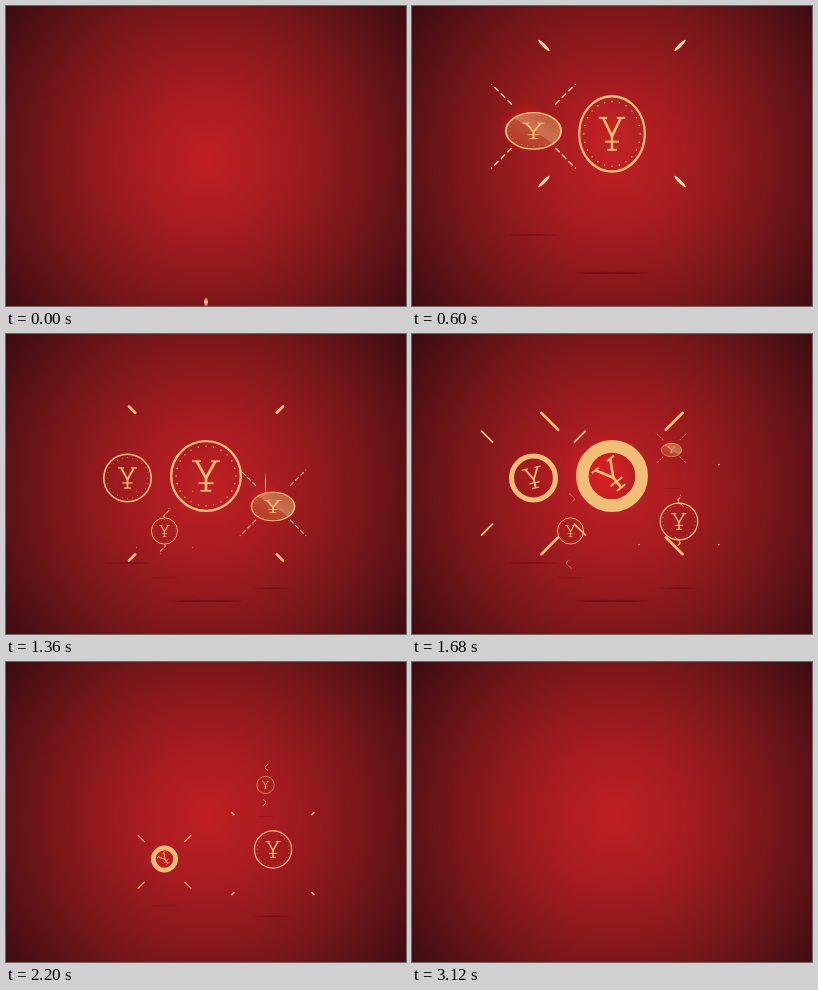
An HTML page with a canvas for the animation above (3320 ms loop, 400x300 px).

```html
<!DOCTYPE html>
<html lang="en">
<head>
<meta charset="utf-8">
<title>Coins</title>
<style>
html, body { margin: 0; width: 100%; height: 100%; overflow: hidden; }
body { background: radial-gradient(circle at 202px 154px,
  #bf2024, #a61c20 72px, #7a1719 154px, #3a0c12 255px); }
canvas { display: block; width: 400px; height: 300px; }
</style>
</head>
<body>
<canvas id="stage"></canvas>
<script>
const LOOP = 3320, STEP = 40, TAU = Math.PI * 2;
const GOLD = '#eebf74', PALE = '#fbdc9c';
const canvas = document.getElementById('stage');
const ctx = canvas.getContext('2d');
const ratio = window.devicePixelRatio || 1;
canvas.width = 400 * ratio;
canvas.height = 300 * ratio;

// start is the moment of the pop; each coin runs the same cycle around it
const coins = [
  { x: 200, y: 142, r: 36, start: 480 },
  { x: 121.5, y: 144, r: 24.5, start: 600 },
  { x: 158.5, y: 197, r: 13.5, start: 1000 },
  { x: 267, y: 187.5, r: 19.2, start: 1360 },
  { x: 259.5, y: 123, r: 9, start: 1680 }
];

const progress = (p, from, to) => Math.min(1, Math.max(0, (p - from) / (to - from)));
const easeOut = (u, power) => 1 - (1 - u) ** power;
const approach = (time, tau) => 1 - Math.exp(-Math.max(0, time) / tau);
const bell = (p, centre, width) => Math.exp(-(((p - centre) / width) ** 2));

function ellipse(x, y, rx, ry) {
  ctx.beginPath();
  ctx.ellipse(x, y, rx, ry, 0, 0, TAU);
  ctx.fill();
}

function line(x1, y1, x2, y2) {
  ctx.beginPath();
  ctx.moveTo(x1, y1);
  ctx.lineTo(x2, y2);
  ctx.stroke();
}

// all parts draw in units of the coin radius, p in ms from the pop

function shadow(p) {
  const width = progress(p, -160, 0) * (1 - progress(p, 1200, 1420));
  ctx.fillStyle = 'rgba(85,5,14,.45)';
  ellipse(0, 3.47, width, 0.03);
}

function streak(p, r) {
  const launch = -340 - 4 * r;
  const height = delay => 4.4 - 5.4 * easeOut(progress(p - delay, launch, launch + 260), 3);
  const top = height(0), end = height(55);
  if (end <= top) return;
  const g = ctx.createLinearGradient(0, top, 0, end);
  g.addColorStop(0, 'rgba(255,200,120,.35)');
  g.addColorStop(0.5, PALE);
  g.addColorStop(1, 'rgba(255,200,120,.35)');
  ctx.fillStyle = g;
  ellipse(0, (top + end) / 2, 0.05, (end - top) / 2);
}

// four diagonal marks around a centre, from a to b on each axis
function diagonals(cy, a, b, mark) {
  for (let i = 0; i < 4; i++) {
    ctx.save();
    ctx.translate(0, cy);
    ctx.rotate(TAU * (i + 0.5) / 4);
    mark(a * Math.SQRT2, b * Math.SQRT2);
    ctx.restore();
  }
}

function burst(p) {
  if (p < -120 || p > 430) return;
  const a = 2.1 * approach(p + 55, 100);
  const b = 2.1 * approach(p + 120, 72) + 0.02;
  ctx.fillStyle = ctx.strokeStyle = PALE;
  ctx.lineWidth = 0.055;
  diagonals(-0.97 + 0.14 * progress(p, 0, 400) ** 2, a, b, (from, to) => {
    if (p < 60) {
      ctx.setLineDash([0.25, 0.13]);
      line(from, 0, to, 0);
      ctx.setLineDash([]);
    } else {
      ellipse((from + to) / 2, 0, (to - from) / 2, 0.05 - 0.02 * progress(p, 60, 320));
    }
  });
}

function gather(p) {
  const u = progress(p, 810, 1400);
  const a = 2.07 * (1 - 0.42 * u), b = 2.14 * (1 - u ** 6);
  if (u === 0 || a >= b) return;
  ctx.strokeStyle = GOLD;
  ctx.lineWidth = 0.075;
  ctx.lineCap = 'round';
  diagonals(0.21, a, b, (from, to) => line(from, 0, to, 0));
  ctx.lineCap = 'butt';
}

function ribbons(p) {
  const u = progress(p, 260, 760);
  if (u === 0 || u === 1) return;
  const near = 0.6 + 1.8 * u, far = 0.8 + 2.1 * easeOut(u, 2);
  const n = 24;
  const wave = y => 0.12 + 0.17 * Math.cos((y - 1.52) * 7.4);
  ctx.fillStyle = GOLD;
  for (const side of [-1, 1]) {
    ctx.save();
    ctx.scale(-side, side);
    ctx.globalAlpha = 1 - progress(p, 560, 800);
    ctx.beginPath();
    for (let i = 0; i <= 2 * n; i++) {
      const v = (i <= n ? i : 2 * n - i) / n;
      const y = near + (far - near) * v;
      const half = (0.015 + 0.035 * Math.abs(Math.sin(v * TAU))) * (i <= n ? 1 : -1);
      ctx.lineTo(wave(y) + half, y);
    }
    ctx.fill();
    ellipse(wave(far), far + 0.1, 0.03, 0.03);
    ctx.restore();
  }
}

function glow(p, y) {
  const alpha = 0.55 * bell(p, 0, 110) + 0.45 * bell(p, 1210, 110);
  if (alpha < 0.01) return;
  const g = ctx.createRadialGradient(-0.3, y - 0.15, 0.3, -0.3, y - 0.15, 1.1);
  g.addColorStop(0, `rgba(245,30,35,${alpha})`);
  g.addColorStop(1, 'rgba(245,30,35,0)');
  ctx.fillStyle = g;
  ctx.fillRect(-2, y - 2, 4, 4);
}

function shine(alpha) {
  const g = ctx.createLinearGradient(-0.7, 0.7, 0.7, -0.7);
  g.addColorStop(0, 'rgba(175,65,42,.8)');
  g.addColorStop(0.5, 'rgba(190,85,55,.85)');
  g.addColorStop(0.52, 'rgba(208,130,88,.85)');
  g.addColorStop(1, 'rgba(195,105,68,.85)');
  ctx.globalAlpha = alpha;
  ctx.fillStyle = g;
  ellipse(0, 0, 1, 1);
  ctx.globalAlpha = 1;
}

function emblem() {
  ctx.lineWidth = 0.075;
  for (const side of [-1, 1]) {
    line(side * 0.26, -0.41, 0, 0.06);
  }
  line(0, 0.03, 0, 0.42);
  ctx.lineWidth = 0.05;
  for (const side of [-1, 1]) {
    line(side * 0.14, -0.41, side * 0.39, -0.41);
  }
  line(-0.21, 0.2, 0.21, 0.2);
  line(-0.15, 0.41, 0.15, 0.41);
}

function rim() {
  const count = 24;
  for (let i = 0; i < count; i++) {
    const angle = i * TAU / count;
    ellipse(0.83 * Math.cos(angle), 0.83 * Math.sin(angle), 0.02, 0.02);
  }
}

function coin(p) {
  if (p < -180 || p >= 1420) return;
  const y = progress(p, -180, 205) ** 2 - 1;
  const age = Math.max(0, p);
  const wobble = 0.2 * Math.cos(age * Math.PI / 140) * Math.exp(-age / 130);
  const size = easeOut(progress(p, -180, 0), 2) * (1 - progress(p, 1230, 1420) ** 2);
  const close = progress(p, 960, 1420);
  const band = 0.065 + 0.55 * close;

  glow(p, y);
  ctx.save();
  ctx.translate(0, y);
  ctx.scale(size * (1 + 0.8 * wobble), size * (1 - 1.15 * wobble));
  shine((1 - progress(p, 0, 160)) ** 2);
  ctx.fillStyle = ctx.strokeStyle = GOLD;
  ctx.save();
  ctx.rotate(-TAU * 0.3 * close ** 1.6);
  rim();
  emblem();
  ctx.restore();
  ctx.lineWidth = band;
  ctx.beginPath();
  ctx.arc(0, 0, 1 - band / 2, 0, TAU);
  ctx.stroke();
  ctx.restore();
}

function draw(now) {
  const t = Math.floor((now % LOOP) / STEP) * STEP;
  ctx.setTransform(ratio, 0, 0, ratio, 0, 0);
  ctx.clearRect(0, 0, 400, 300);
  for (const c of coins) {
    const p = t - c.start;
    if (p >= 1440) continue;
    ctx.save();
    ctx.translate(c.x, c.y);
    ctx.scale(c.r, c.r);
    for (const part of [shadow, streak, burst, ribbons, coin, gather]) part(p, c.r);
    ctx.restore();
  }
}

const begin = performance.now();
function tick() {
  draw(performance.now() - begin);
  requestAnimationFrame(tick);
}
tick();
</script>
</body>
</html>
```
